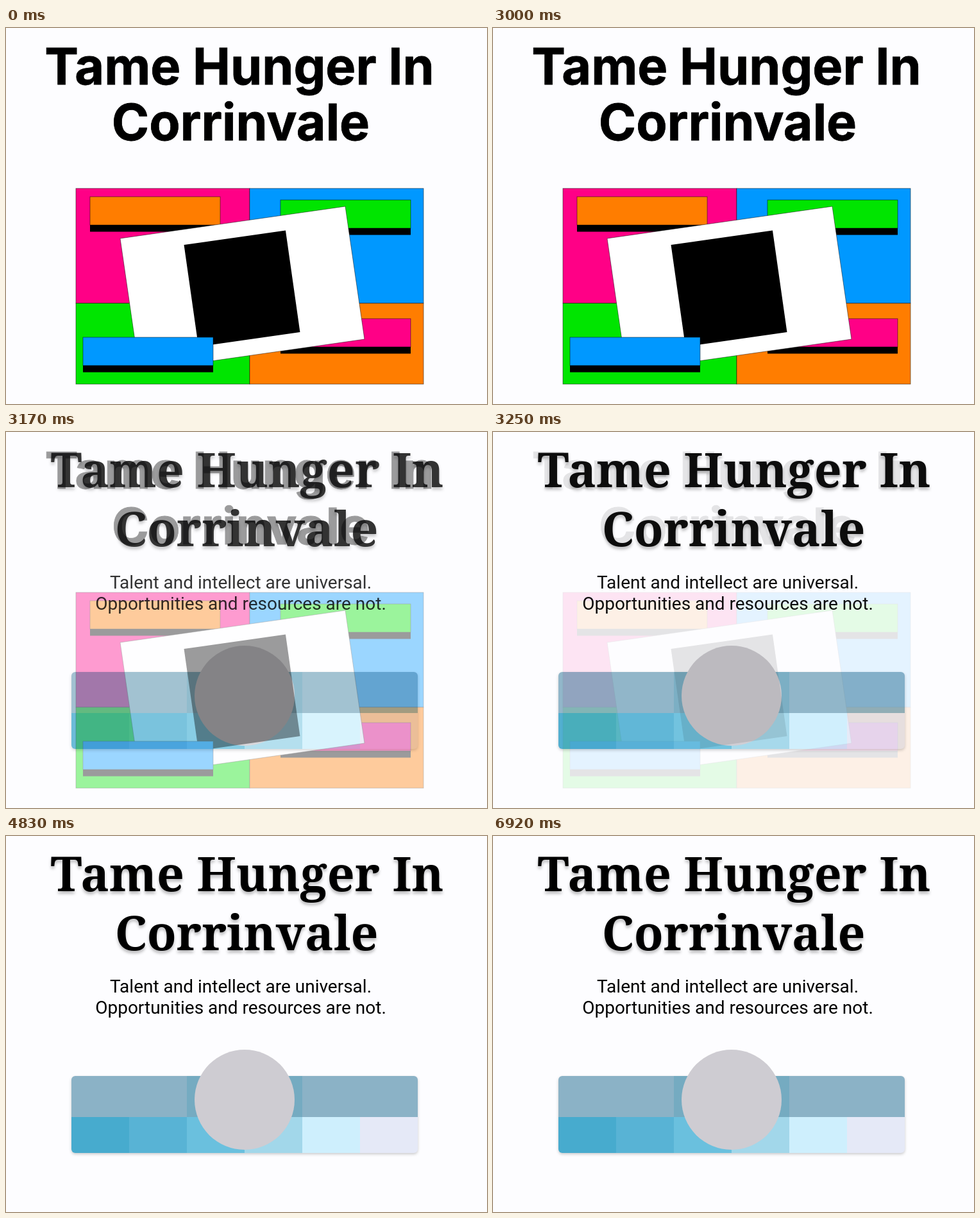
An HTML page without scripts that plays this animation: 750 by 586 pixels, repeating every 7010 ms.

```html
<!DOCTYPE html>
<html lang="en">
<head>
<meta charset="utf-8">
<title>Rebrand dissolve</title>
<style>
  html, body { margin: 0; width: 100%; height: 100%; overflow: hidden; background: #fdfdff; }
  svg { display: block; width: 100vw; height: 100vh; isolation: isolate; }
  text { text-anchor: middle; }

  .before, .after { animation: 7010ms step-end infinite; }
  .before { animation-name: leave; }
  .after { animation-name: enter; mix-blend-mode: multiply; }

  .grotesk { font: 700 79px Inter, sans-serif; stroke: #000; stroke-width: .8; }
  .serif { font: 700 75px "Noto Serif", serif; filter: drop-shadow(0 4px 2px rgb(0 0 0 / .25)); }
  .tagline { font: 400 28px Roboto, sans-serif; }
  .palette { filter: drop-shadow(0 2px 2px rgb(0 0 0 / .2)); }

  .pink { fill: #ff0086; }
  .blue { fill: #0098ff; }
  .green { fill: #00e500; }
  .orange { fill: #ff7d00; }
  .panels rect, .chip, .card { stroke: rgb(0 0 0 / .6); stroke-width: .8; }
  .card { fill: #fff; }

  @keyframes leave {
    0% { opacity: 1; }
    43.87% { opacity: .75; }
    45.15% { opacity: .39; }
    46.29% { opacity: .1; }
    47.43%, 100% { opacity: 0; }
  }
  @keyframes enter {
    0% { opacity: 0; }
    43.87% { opacity: .38; }
    45.15% { opacity: .8; }
    46.29% { opacity: .95; }
    47.43%, 100% { opacity: 1; }
  }
</style>
</head>
<body>
<svg viewBox="0 0 750 586">
  <defs>
    <clipPath id="rounded"><rect x="102" y="374" width="540" height="120" rx="6"/></clipPath>
    <g id="swatch">
      <rect class="chip" width="203" height="44"/>
      <rect y="44" width="203" height="10.5" fill="#000"/>
    </g>
  </defs>
  <rect width="750" height="586" fill="#fdfdff"/>

  <g class="before">
    <g class="grotesk">
      <text x="364" y="88">Tame Hunger In</text>
      <text x="366" y="175">Corrinvale</text>
    </g>
    <g class="panels">
      <rect class="pink" x="109" y="250" width="271" height="179"/>
      <rect class="blue" x="380" y="250" width="271" height="179"/>
      <rect class="green" x="109" y="429" width="271" height="126"/>
      <rect class="orange" x="380" y="429" width="271" height="126"/>
    </g>
    <use href="#swatch" class="orange" x="131" y="263"/>
    <use href="#swatch" class="green" x="428" y="268"/>
    <use href="#swatch" class="pink" x="428" y="453"/>
    <path class="card" d="M178 328 529 278 559 485 208 535Z"/>
    <rect x="-80" y="-80" width="160" height="160" transform="translate(368 406) rotate(-8.1)"/>
    <use href="#swatch" class="blue" x="120" y="482"/>
  </g>

  <g class="after">
    <g class="serif">
      <text x="376" y="86">Tame Hunger In</text>
      <text x="375" y="178">Corrinvale</text>
    </g>
    <g class="tagline">
      <text x="366" y="244">Talent and intellect are universal.</text>
      <text x="366" y="277">Opportunities and resources are not.</text>
    </g>
    <g class="palette">
      <g clip-path="url(#rounded)">
        <path fill="#8cb4c6" d="M102 374h540v64h-540z"/>
        <path fill="#76adc1" d="M282 374h180v64h-180z"/>
        <path fill="#47adce" d="M102 438h90v56h-90z"/>
        <path fill="#59b5d5" d="M192 438h90v56h-90z"/>
        <path fill="#6bc2de" d="M282 438h90v56h-90z"/>
        <path fill="#a3d9ea" d="M372 438h90v56h-90z"/>
        <path fill="#d0f1fd" d="M462 438h90v56h-90z"/>
        <path fill="#e7ebf7" d="M552 438h90v56h-90z"/>
      </g>
    </g>
    <circle cx="372" cy="411" r="78" fill="#d0ced2"/>
  </g>
</svg>
</body>
</html>
```
